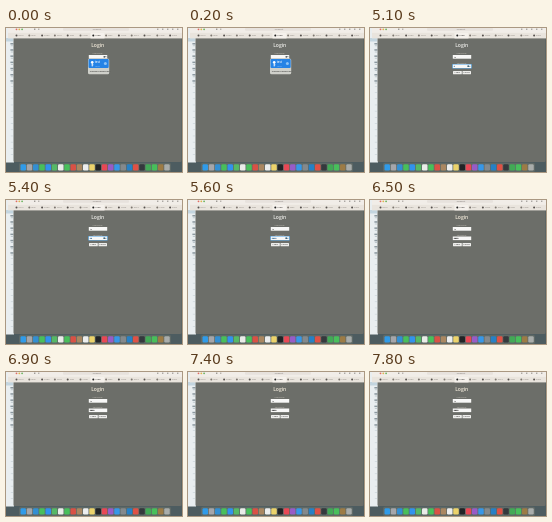
These frames come from a looping animation (176 by 144 pixels, 8000 ms). An HTML page:

```html
<!DOCTYPE html>
<html lang="en">
<head>
<meta charset="utf-8">
<title>Login form</title>
<style>
html, body { margin: 0; width: 100%; height: 100%; overflow: hidden; background: #4d5c60; }
svg { display: block; width: 100vw; height: 100vh; }
text { font-family: "Open Sans", Arial, sans-serif; }
</style>
</head>
<body>
<svg id="stage" viewBox="0 0 176 144" preserveAspectRatio="none"></svg>
<script>
const NS = 'http://www.w3.org/2000/svg';
const LOOP = 8000;
const stage = document.getElementById('stage');

function add(parent, tag, attrs, content) {
  const node = document.createElementNS(NS, tag);
  for (const key in attrs) node.setAttribute(key, attrs[key]);
  if (content) node.textContent = content;
  parent.appendChild(node);
  return node;
}
const box = (p, x, y, width, height, fill, more) =>
  add(p, 'rect', { x, y, width, height, fill, ...more });
const dot = (p, cx, cy, r, fill) => add(p, 'circle', { cx, cy, r, fill });
const label = (p, x, y, size, fill, content, more) =>
  add(p, 'text', { x, y, 'font-size': size, fill, ...more }, content);
const group = () => add(stage, 'g', {});
const show = (node, on) => node.setAttribute('visibility', on ? 'visible' : 'hidden');
const middle = { 'text-anchor': 'middle' };

function drawDesktop() {
  const g = group();
  box(g, 0, 0, 176, 144, '#4d5c60');
  box(g, 0, 0, 8, 134.5, '#e9eef0');
  box(g, 0, 10, 7, 3.5, '#c3d5df');
  // Text of the window peeking out on the left
  for (let y = 15; y < 54; y += 6.2) {
    box(g, 4.4, y, 3, 1.5, '#8b989f');
    box(g, 4.8, y + 2.4, 2.2, .8, '#b3bec3');
  }
  for (let y = 58; y < 132; y += 6.2) box(g, 4.8, y, 2.2, .7, '#cbd5da');
}

function drawBrowser() {
  const g = group();
  box(g, 7.5, 0, 168, 134, '#6c6e69', { rx: 1.2 });
  box(g, 2, 0, 174, 5, '#f1ede8');
  box(g, 2, 4.8, 174, 5.6, '#e9e4dd');
  box(g, 84.5, 5, 14, 5.4, '#f5f1ec');
  dot(g, 10.5, 1.3, .9, '#e16b60');
  dot(g, 13.3, 1.3, .9, '#dfb64d');
  dot(g, 16.1, 1.3, .9, '#67b35a');
  box(g, 28, .6, 1.4, 1.2, '#8b8783');
  box(g, 32, .6, 1.4, 1.2, '#aaa5a0');
  box(g, 57, 0, 66, 2.8, '#e7e2dd', { rx: 1 });
  label(g, 91, 2.1, 2, '#6d6966', 'localhost', middle);
  for (let x = 151; x < 173; x += 5) box(g, x, .6, 1.4, 1.2, '#9b9793');

  for (let i = 0; i < 13; i++) {
    const x = 9.5 + i * 12.8;
    const active = i === 6;
    dot(g, x + 1, 7.6, 1, active ? '#202020' : i % 2 ? '#7c766f' : '#55504c');
    label(g, x + 3, 8.4, 2.2, active ? '#292725' : '#857f79', active ? 'Login' : ['Docs', 'Mail', 'Code'][i % 3]);
  }
}

function drawDock() {
  const g = group();
  box(g, 13, 134.8, 152, 9.2, '#5f6966', { rx: 2 });
  const colors = ['#309be9', '#a5a6aa', '#338fd2', '#48bf5b', '#3292ed', '#56b866',
    '#e9ece8', '#48bf5b', '#d95145', '#a98761', '#eceeee', '#ecd36b',
    '#222426', '#e84855', '#975cc7', '#3797e8', '#84898c', '#2780c5',
    '#df5145', '#34393d', '#42a956', '#48bf5b', '#9c7b45', '#a9adab'];
  colors.forEach((fill, i) => {
    const x = 14.5 + i * 6.25;
    box(g, x, 136.2, 5.5, 6.2, fill, { rx: 1.2 });
  });
}

function field(y) {
  const g = group();
  box(g, 82.8, y, 18.4, 3.7, '#f8f8f7');
  return g;
}

function button(g, x, width, name) {
  box(g, x, 43, width, 3.2, '#eeeeec', { rx: .5 });
  label(g, x + width / 2, 45.4, 2.2, '#333', name, middle);
}

drawDesktop();
drawBrowser();
drawDock();

const title = label(group(), 91.7, 18.8, 5, '#f1e9d9', 'Login', { ...middle, 'font-weight': 600 });
label(group(), 91.5, 26.2, 2.1, '#c9c5bc', 'Username', middle);
const user = field(27);
const userText = label(user, 84, 29.6, 2.4, '#353535', 'te');

const form = group();
label(form, 91.5, 35.6, 2.1, '#c9c5bc', 'Password', middle);
const ring = box(form, 82.3, 36, 19.4, 4.6, '#479fe5', { rx: .6 });
box(form, 82.8, 36.5, 18.4, 3.6, '#f8f8f7');
const dots = [0, 1, 2, 3].map(i => dot(form, 84.3 + i * 1.2, 38.3, .55, '#222'));
const key = add(form, 'g', {});
dot(key, 98.2, 38.2, .9, '#3e6378');
box(key, 98.6, 37.9, 1.8, .6, '#3e6378');
button(form, 83, 8.8, 'Login');
button(form, 92.5, 8.5, 'Cancel');

const popup = group();
box(popup, 82, 30.4, 21.2, 15.8, '#cfd0ca', { rx: 1.5 });
box(popup, 82.5, 30.9, 20.2, 9.2, '#2583e6', { rx: 1 });
dot(popup, 86.2, 34.3, 1.3, '#fff');
box(popup, 85.7, 35, 1, 3.4, '#fff');
box(popup, 86.5, 36.5, .9, .7, '#fff');
label(popup, 88.8, 35.2, 2.7, '#fff', 'test', { 'font-weight': 600 });
label(popup, 88.8, 38.5, 2.3, '#dceaff', '••••••');
dot(popup, 99.4, 35.6, 1.5, '#8cc2f5');
label(popup, 83.8, 43.9, 2.1, '#3e3e3c', 'Manage passwords…', { 'font-weight': 600 });
const userKey = group();
dot(userKey, 98.3, 28.8, .9, '#4c5860');
box(userKey, 98.7, 28.5, 1.8, .6, '#4c5860');

function render(t) {
  const picking = t < 5100;
  const focused = !picking && t < 6200;
  show(popup, picking);
  show(userKey, picking);
  show(form, !picking);
  show(userText, !picking);
  show(ring, focused);
  show(key, focused);
  const typed = picking ? 0 : Math.min(4, 1 + Math.floor((t - 5100) / 160));
  dots.forEach((d, i) => {
    show(d, i < typed);
    d.setAttribute('fill', focused ? '#2a5f8c' : '#222');
  });
  title.setAttribute('fill', t >= 100 && t < 5800 ? '#eeeeea' : '#f1e9d9');
}

const start = performance.now();
function frame() {
  render((performance.now() - start) % LOOP);
  requestAnimationFrame(frame);
}
render(0);
requestAnimationFrame(frame);
</script>
</body>
</html>
```
